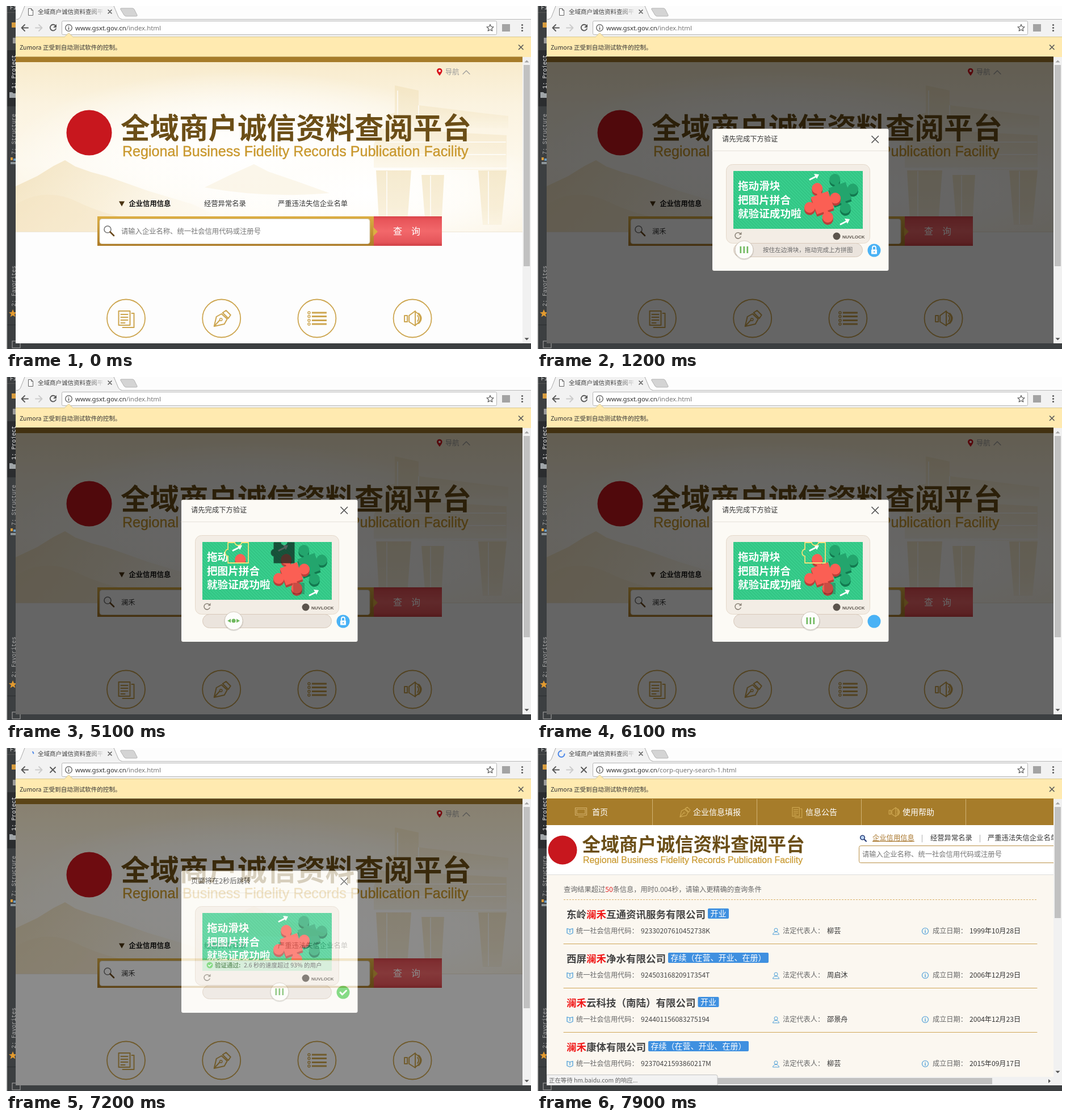
Write an HTML page that moves like this. It is 925 px wide and 605 px high and loops after 8000 ms.

```html
<!DOCTYPE html>
<html lang="zh-CN">
<head>
<meta charset="utf-8">
<title>Slider check</title>
<style>
html, body { margin: 0; width: 100%; height: 100%; overflow: hidden; background: #3c3f41; }
svg { display: block; width: 100vw; height: 100vh; }
text { font-family: 'Noto Sans CJK SC', 'Noto Sans CJK', sans-serif; white-space: pre; }
.lat { font-family: 'Liberation Sans', Arial, sans-serif; }
.url { font-family: 'Noto Sans', 'Open Sans', sans-serif; }
.ide { font-family: 'Liberation Mono', monospace; }
.b { font-weight: 700; }
.line { fill: none; stroke-linecap: round; stroke-linejoin: round; }
</style>
</head>
<body>
<svg id="stage" viewBox="0 0 925 605"></svg>
<script>
const SITE = '全域商户诚信资料查阅平台';
const SITE_EN = 'Regional Business Fidelity Records Publication Facility';
const BRAND = '澜禾';
const HINT = '请输入企业名称、统一社会信用代码或注册号';
const GOLD = '#cda650', DRAG = 117;

const text = (x, y, s, size, fill, attrs = '') =>
  `<text x="${x}" y="${y}" font-size="${size}" fill="${fill}" ${attrs}>${s}</text>`;
const rect = (x, y, w, h, fill, attrs = '') =>
  `<rect x="${x}" y="${y}" width="${w}" height="${h}" fill="${fill}" ${attrs}/>`;
const circle = (x, y, r, fill, attrs = '') =>
  `<circle cx="${x}" cy="${y}" r="${r}" fill="${fill}" ${attrs}/>`;
const shape = (d, fill, attrs = '') => `<path d="${d}" fill="${fill}" ${attrs}/>`;
const line = (d, stroke, w = 1, attrs = '') =>
  `<path class="line" d="${d}" stroke="${stroke}" stroke-width="${w}" ${attrs}/>`;
const group = (id, body, attrs = '') => `<g id="${id}" ${attrs}>${body}</g>`;
const at = (x, y, body, k = 1) => `<g transform="translate(${x} ${y}) scale(${k})">${body}</g>`;
const stops = list => list.map(([o, c, a = 1]) =>
  `<stop offset="${o}" stop-color="${c}" stop-opacity="${a}"/>`).join('');
const gradient = (id, dir, ...list) => `<linearGradient id="${id}" ${dir}>${stops(list)}</linearGradient>`;
const DOWN = 'x1="0" y1="0" x2="0" y2="1"';

const PIECE = 'M472 292h12a6 5 0 0 0 12 0h12v36h-36v-12a5 6 0 0 1 0-12z';

const defs = '<defs>' +
  gradient('sky', DOWN, [0, '#f8ebcc'], [.25, '#fbf3e0'], [.6, '#fdf8ec'], [1, '#fcf5e6']) +
  `<radialGradient id="glow">${stops([[0, '#fff'], [.5, '#fffefb', .85], [1, '#fff', 0]])}</radialGradient>` +
  gradient('hill', 'x1="0" y1="0" x2="1" y2=".4"', [0, '#efdcb2', .75], [.5, '#f6e9cb', .6], [1, '#fdf7ea', .2]) +
  gradient('stone', DOWN, [0, '#f3e4c0'], [.6, '#f6eacd'], [1, '#fbf4e2']) +
  gradient('gold', DOWN, [0, '#dcae43'], [1, '#ad7b27']) +
  gradient('red', DOWN, [0, '#d9444a'], [.12, '#e8555a'], [.5, '#f2686b'], [.88, '#e5555a'], [1, '#cf3f44']) +
  gradient('tabFade', '', [0, '#f2f2f2', 0], [1, '#f2f2f2']) +
  gradient('shineFill', '', [0, '#fff', 0], [.45, '#fff', .9], [.6, '#fff', .95], [1, '#fff', 0]) +
  `<pattern id="stripes" width="4" height="4" patternUnits="userSpaceOnUse" patternTransform="rotate(-45)">
    ${rect(0, 0, 4, 4, '#39cf8d')}${rect(0, 0, 1.4, 4, '#2fc081')}</pattern>
  <clipPath id="page">${rect(17, 89, 893, 506, '#000')}</clipPath>
  <clipPath id="photo">${rect(346, 291, 228, 102, '#000')}</clipPath>
  <clipPath id="pieceClip">${shape(PIECE, '#000')}</clipPath>
  <g id="jig"><path d="M-16-16h32v32h-32zM-24-4h48v8h-48zM-4-27h8v54h-8z"/>
    ${[[24, 0], [-24, 0], [0, 27], [0, -27]].map(([x, y]) => `<circle cx="${x}" cy="${y}" r="9.5"/>`).join('')}</g>
</defs>`;

function ide() {
  const label = (y, s, fill) => text(0, 0, s, 10, fill, `class="ide" transform="translate(16.5 ${y}) rotate(-90)"`);
  return rect(0, 0, 925, 605, '#3c3f41') + rect(0, 0, 2, 605, '#d5d5d5') +
    rect(2, 78, 15, 99, '#2b2d2f') + rect(2, 562, 15, 1, '#2b2d2f') +
    text(7, 6, 'Fi', 10, '#ccc', 'class="ide"') + rect(2, 11, 15, 1, '#555') +
    rect(10, 29, 8, 9, '#d79c3f') + rect(12, 56, 5, 10, '#9a9a9a') +
    label(146, '1: Project', '#eee') + shape('M6 152h5l2 2h4v8H6z', '#a0a5a8') +
    label(262, '7: Structure', '#aaa') + rect(8, 267, 4, 5, '#d79c3f') + rect(13, 269, 4, 4, '#6a9ac0') + rect(8, 275, 9, 4, '#8d9599') +
    label(530, '2: Favorites', '#aaa') + shape('M12 535l2 5 5 .4-4 3.2 1.4 5-4.4-2.8-4.4 2.8 1.4-5-4-3.2 5-.4z', '#e29a2f') +
    rect(11, 591, 14, 12, 'none', 'stroke="#aaa"');
}

function browser() {
  const ink = '#5a5a5a';
  return rect(17, 0, 908, 595, '#fdfdfd') + rect(17, 23, 908, 32, '#f2f2f2') +
    line('M17 23.5H22M203 23.5H925', '#b8b8b8') +
    shape('M20 24Q24 23 26 18L33 0H190L198 19Q200 23 204 24z', '#f2f2f2') +
    line('M20 23.5Q24 23 26 18L33 0M190 0L198 19Q200 23 204 23.5', '#aaa') +
    shape('M203 4h20q2 0 3 2l5 10q1 2-2 2h-17q-3 0-4-2l-6-10q-1-2 1-2z', '#d4d4d4', 'stroke="#b5b5b5"') +
    group('doc', shape('M39.5 4.5h5l3 3v9h-8z', '#fff', 'stroke="#666"') + line('M44.5 4.5v3h3', '#666')) +
    group('spinner', line('M0-5.5A5.5 5.5 0 1 0 5.5 0', '#4a86e8', 2)) +
    text(56, 14, SITE.slice(0, 11), 10.5, '#444') + rect(148, 2, 25, 18, 'url(#tabFade)') +
    line('M180 7l6 6m0-6l-6 6', ink, 1.6) +
    line('M39 38.5H28m5-5.5l-5.5 5.5 5.5 5.5', ink, 1.8) +
    line('M52 38.5h11m-5-5.5l5.5 5.5-5.5 5.5', '#ccc', 1.8) +
    group('reload', line('M87 34.5a5.3 5.3 0 1 0 1 5.5', ink, 1.8) + shape('M89 32v6h-6z', ink)) +
    group('stop', line('M78 34l9 9m0-9l-9 9', ink, 1.8)) +
    rect(98.5, 26.5, 766, 24, '#fff', 'rx="2" stroke="#b5b5b5"') +
    circle(110.5, 38.5, 5.8, 'none', `stroke="${ink}" stroke-width="1.3"`) + line('M110.5 38v3.4M110.5 35.4v.2', ink, 1.5) +
    `<text class="url" x="122" y="43" font-size="11.4" fill="#333">www.gsxt.gov.cn<tspan id="path" fill="#777"></tspan></text>` +
    line('M853 32.5l1.8 4 4.2.4-3.2 2.9 1 4.2-3.8-2.2-3.8 2.2 1-4.2-3.2-2.9 4.2-.4z', ink, 1.2) +
    rect(874, 32, 14, 13, '#a3a3a3') + [33.5, 38.5, 43.5].map(y => circle(909.5, y, 1.6, ink)).join('') +
    rect(17, 55, 908, 35, '#ffeab0') + line('M17 54.5H103M118 54.5H925', '#d9c98f') +
    shape('M103 55l7.5-7 7.5 7z', '#ffeab0') + line('M103 54.5l7.5-7 7.5 7', '#d9c98f') +
    text(24, 77, 'Zumora 正受到自动测试软件的控制。', 10.6, '#333') + line('M903.5 69l7.5 7.5m0-7.5l-7.5 7.5', ink, 1.7);
}

const goldRing = (x, y, r) => circle(x, y, r, 'none', `stroke="${GOLD}" stroke-width="1.5"`);
const icons = {
  docs: line('M-13-13h20v25h-20zM10-9h4v25h-20M-9-7h12M-9-2h12M-9 3h12M-9 8h7', GOLD, 2),
  pen: line('M-13 14l4-17 9-5 10 9-5 9zM-13 14l10-11M2-10l6-4 8 8-4 6z', GOLD, 2) + goldRing(-1, 2, 2.2),
  list: [-10, -3.5, 3.5, 10].map(y => goldRing(-14, y, 2) + rect(-9, y - 1.5, 26, 3, GOLD)).join(''),
  horn: line('M-14-5h5V6h-5zM-6-5L5-13V13L-6 6zM9-5q4 5 0 10M11-9q9 9 0 18M5-12q18 12 0 24', GOLD, 2)
};

function home() {
  const hero = rect(17, 99, 893, 299, 'url(#sky)') +
    '<ellipse cx="420" cy="265" rx="420" ry="150" fill="url(#glow)"/><ellipse cx="640" cy="330" rx="330" ry="110" fill="url(#glow)"/>' +
    shape('M17 318L55 300 84 282 104 272 122 283 150 293 176 300 205 310 250 326 330 350 430 398H17z', 'url(#hill)') +
    shape('M17 350Q70 318 125 345T250 380L300 398H17z', '#f2e2bd', 'opacity=".4"') +
    shape('M350 320L395 298 437 279 462 292 520 312 570 330Q460 340 350 320z', '#f7ecd2', 'opacity=".45"') +
    `<g fill="url(#stone)" opacity=".75"><path d="M685 140l42 9v26l113 14 45 5v22l-215-3v-20l15-5z"/>
      <path d="M660 216l222 12v62l-234-4v-42z" opacity=".7"/><path d="M652 290h62l-8 106h-48zM732 298h40l-5 90h-28zM832 290h50l-9 96h-33z"/></g>` +
    line('M690 150v55M727 176v35M648 286h235M672 240h208M680 262h200M671 292v102M748 300v86M850 292v92', '#fff', 2, 'opacity=".7"') +
    line('M17 398.5H910', '#eee6d6');
  const search = rect(161, 371, 487, 52, 'url(#gold)') + rect(165, 375.5, 476, 44, '#fff', 'rx="4" stroke="#d3c7a8"') +
    circle(179, 394, 6, 'none', 'stroke="#777" stroke-width="1.6"') + line('M183.5 398.5l6.5 6.5', '#6b4a1e', 2.6) +
    group('hint', text(203, 402, HINT, 12.3, '#757575')) + '<text id="query" x="203" y="402" font-size="12.3" fill="#333"></text>' +
    rect(648, 371, 120, 52, 'url(#red)') + shape('M647 390l8 8-8 8z', '#dcae43') +
    text(682, 403, '查', 16, '#fff') + text(714, 403, '询', 16, '#fff');
  return rect(17, 89, 893, 506, '#fdfdfd') + hero + rect(17, 90, 893, 9, '#a67c2a') + rect(17, 89, 893, 1, '#c9ad6b') +
    shape('M764 123q-5-6-5-8.5a4.8 4.8 0 0 1 9.6 0q0 2.5-4.6 8.5z', '#d8141c') + circle(764, 114.5, 2, '#fff') +
    text(774, 121, '导航', 12.3, '#999') + line('M805 120l6-6 6 6', '#999', 1.2) +
    circle(146.5, 223.5, 40, '#c8171e') +
    text(202, 234, SITE, 51.5, '#6b4e17', 'class="b"') +
    text(205, 265, SITE_EN, 25.1, '#c9992f', 'class="lat" stroke="#c9992f" stroke-width=".4"') +
    shape('M199 344.5h10l-5 9z', '#4a3310') + text(216.5, 353, '企业信用信息', 12.3, '#111', 'class="b"') +
    text(349, 353, '经营异常名录', 12.3, '#333') + text(479, 353, '严重违法失信企业名单', 12.3, '#333') + search +
    Object.values(icons).map((icon, i) => at(211.5 + i * 168.2, 551,
      circle(0, 0, 33.5, 'none', `stroke="${GOLD}" stroke-width="1.8"`) + icon)).join('');
}

function photo() {
  const jig = (x, y, fill) => `<use href="#jig" transform="translate(${x} ${y}) rotate(-20)" fill="${fill}"/>`;
  const arrow = (x, y) => at(x, y, line('M-7 4L5-2', '#fff', 3) + shape('M0-6l9 1-4 8z', '#fff'));
  return rect(346, 291, 228, 102, 'url(#stripes)') +
    jig(534, 335, '#12794f') + jig(534, 331, '#23a56d') + jig(503, 351, '#b8403a') + jig(503, 347, '#fb5f54') +
    arrow(488, 302) + arrow(542, 381) +
    ['拖动滑块', '把图片拼合', '就验证成功啦'].map((s, i) => text(354, 324 + i * 24.5, s, 18.6, '#fff', 'font-weight="900"')).join('');
}

function dialog() {
  const tick = (x, y, r) => circle(x, y, r, '#5fd05f') + at(x, y, line('M-5 0l3.5 4 7-7', '#fff', 2.8), r / 11.5);
  const handle = circle(365, 431, 17, '#000', 'opacity=".12"') + circle(365, 430, 16, '#fdfdfb', 'stroke="#d6cdc0"') +
    group('bars', [358, 364, 370].map(x => rect(x - .5, 424, 2.6, 12, '#6fb85e')).join('')) +
    group('arrows', circle(365, 430, 3.5, '#6fb85e') + shape('M360 426.5v7l-6-3.5zM370 426.5v7l6-3.5z', '#6fb85e'));
  const success = rect(346, 374, 228, 19, '#d6ecd6', 'opacity=".94"') + tick(359, 383, 5.5) +
    text(368, 387, '验证通过:', 10.5, '#3d7a3d', 'class="b"') + text(419, 387, '2.6 秒的速度超过 93% 的用户', 10.5, '#555');
  return rect(309, 216.5, 310.5, 250.5, '#fcfaf5', 'rx="3"') + line('M309 255.5H619', '#e6e2da') +
    '<text id="title" x="326" y="239" font-size="12.3" fill="#333"></text>' +
    line('M590 229.5l11.5 11.5m0-11.5l-11.5 11.5', '#555', 1.7) +
    rect(333.5, 279.5, 253, 139, '#f3ede5', 'rx="11" stroke="#e5d9cb"') + group('picture', photo(), 'clip-path="url(#photo)"') +
    group('puzzle', shape(PIECE, '#0b2019', 'opacity=".7" stroke="#0b2019"') + rect(506, 363, 20, 20, '#000', 'opacity=".2"') +
      group('piece', `<g clip-path="url(#pieceClip)"><use href="#picture"/></g>` + line(PIECE, '#f5e27a', 1.8))) +
    `<g clip-path="url(#photo)">${rect(-80, -65, 160, 130, 'url(#shineFill)', 'id="shine"')}${group('success', success)}</g>` +
    line('M358.5 402a5.2 5.2 0 1 0 .5 5', '#8d857a', 1.6) + shape('M360.5 398.5v5h-5z', '#8d857a') +
    circle(528, 406, 6.5, '#5b544c') + text(538, 409.5, 'NUVLOCK', 8, '#5b544c', 'class="lat b"') +
    rect(346.5, 418.5, 227, 24, '#ebe4dd', 'rx="12" stroke="#d8c9ba"') +
    group('tip', text(398, 434, '按住左边滑块，拖动完成上方拼图', 10.55, '#666')) + group('handle', handle) +
    group('blue', circle(594, 431, 11.5, '#4ab2f5') +
      group('lock', rect(589, 429.5, 10, 8, '#fff', 'rx="1"') + line('M591 429v-2.5a3 3 0 0 1 6 0v2.5', '#fff', 1.8) + rect(593.3, 432, 1.6, 3, '#4ab2f5'))) +
    group('done', tick(594, 431, 11.5));
}

function results() {
  const menu = [['首页', 97, ''], ['企业信息填报', 275, 'pen'], ['信息公告', 473, 'docs'], ['使用帮助', 644, 'horn']];
  const rows = [
    ['东岭@互通资讯服务有限公司', 0, '92330207610452738K', '柳芸', '1999年10月28日'],
    ['西屏@净水有限公司', 1, '92450316820917354T', '周启沐', '2006年12月29日'],
    ['@云科技（南陆）有限公司', 0, '924401156083275194', '邵景舟', '2004年12月23日'],
    ['@康体有限公司', 1, '92370421593860217M', '柳芸', '2015年09月17日']
  ];
  const blue = '#4f9fd8';
  const row = ([name, kept, code, person, date], i) => {
    const x = 52 + 17.5 * (name.length + 1) + 4, label = kept ? '存续（在营、开业、在册）' : '开业';
    return `<g transform="translate(0 ${i * 78})">` +
      text(52, 300, name.replace('@', `<tspan fill="#f01818">${BRAND}</tspan>`), 17.5, '#444', 'class="b"') +
      rect(x, 283, label.length * 14 + 9, 18, '#3f90e0', 'rx="2"') + text(x + 4.5, 297, label, 14, '#fff') +
      line('M53 318.5l5 1.5 5-1.5v8l-5 2-5-2zM58 320v5', blue, 1.3) + text(69, 327, '统一社会信用代码：', 12.2, '#666') + text(183, 327, code, 12.1, '#444') +
      circle(421, 321, 3, 'none', `stroke="${blue}"`) + line('M415.5 328.5q1-4 5.5-4t5.5 4z', blue) +
      text(433, 327, '法定代表人：', 12.2, '#666') + text(511, 327, person, 12.2, '#333') +
      circle(684, 323, 5.5, 'none', `stroke="${blue}" stroke-width="1.2"`) + line('M684 322v4M684 320v.1', blue, 1.4) +
      text(697, 327, '成立日期：', 12.2, '#666') + text(762, 327, date, 12.1, '#333') +
      (i < 3 ? line('M47 345.5H881', '#d0a658') : '') + '</g>';
  };
  return rect(17, 89, 893, 506, '#fbf7f0') + rect(17, 136, 893, 87, '#fff') + line('M17 223.5H910', '#ddd') +
    rect(17, 89, 893, 47, '#a67c2a') + [203, 387, 571, 755].map(x => rect(x, 90, 1, 46, '#d0b274')).join('') +
    line('M67.5 105.5h20v13h-20zM70 108h15v8h-15zM73 121.5h9', '#d2b06a', 1.2) +
    menu.map(([s, x, icon]) => text(x, 118, s, 14, '#fff') + (icon ? at(x - 15, 113, icons[icon], .62) : '')).join('') +
    circle(45, 180, 25.5, '#c8171e') + text(79.5, 181.5, SITE, 32.7, '#6b4e17', 'class="b"') +
    text(81, 203, SITE_EN, 15.95, '#c9992f', 'class="lat" stroke="#c9992f" stroke-width=".2"') +
    circle(573.5, 158, 3.8, '#bcd6f5', 'stroke="#2a3f78" stroke-width="1.6"') + line('M577 161.5l3 3', '#2a3f78', 2.2) +
    text(591, 163, '企业信用信息', 12.3, '#a8752a', 'text-decoration="underline"') + text(677, 163, '|', 12, '#999') +
    text(693, 163, '经营异常名录', 12.3, '#333') + text(779, 163, '|', 12, '#999') + text(794, 163, '严重违法失信企业名单', 12.3, '#333') +
    rect(567.5, 172.5, 360, 30, '#fff', 'rx="3" stroke="#b98f45"') + text(573, 192, HINT, 12.3, '#757575') +
    text(47, 254, '查询结果超过<tspan fill="#e02020">50</tspan>条信息，用时0.004秒，请输入更精确的查询条件', 12.2, '#666') +
    line('M47 267.5H881', '#d9b068', 1, 'stroke-dasharray="3 2" style="stroke-linecap:butt"') + rows.map(row).join('') +
    rect(17, 580, 893, 15, '#f1f1f1') + rect(300, 582, 502, 11, '#c1c1c1') + shape('M901 584l4 3.5-4 3.5z', '#505050') +
    shape('M17 576.5H315q3 0 3 3V595H17z', '#f2f2f2', 'stroke="#c4c4c4"') +
    text(21, 590, '正在等待 hm.baidu.com 的响应...', 10.4, '#666');
}

const scrollbar = rect(910, 90, 15, 505, '#f1f1f1') + shape('M913.5 99.5l4-4 4 4z', '#a3a3a3') +
  rect(912, 104, 11, 355, '#c1c1c1', 'id="thumb"') + shape('M913.5 585.5l4 4 4-4z', '#505050', 'id="downArrow"');

document.getElementById('stage').innerHTML = defs + ide() + browser() +
  `<g clip-path="url(#page)">${group('home', home())}${group('results', results())}` +
  group('modal', rect(17, 89, 893, 506, '#000', 'opacity=".6"') + dialog()) + '</g>' + scrollbar;

const el = Object.fromEntries([...document.querySelectorAll('#stage [id]')].map(n => [n.id, n]));
const clamp = v => Math.max(0, Math.min(1, v));
const show = (node, on) => node.setAttribute('display', on ? 'inline' : 'none');
const move = (node, x, y = 0) => node.setAttribute('transform', `translate(${x} ${y})`);
const fade = (node, v) => node.setAttribute('opacity', v);

function render(ms) {
  const t = Math.floor(ms / 100) * 100;
  const loading = t >= 7200, found = t >= 7600, passed = t >= 6300;

  show(el.doc, !loading);
  show(el.spinner, loading);
  el.spinner.setAttribute('transform', `translate(43 10.5) rotate(${(7900 - t) / 100 * -40})`);
  el.spinner.firstChild.setAttribute('stroke-dasharray', found ? '26 40' : '3 40');
  show(el.reload, !loading);
  show(el.stop, loading);
  el.path.textContent = found ? '/corp-query-search-1.html' : '/index.html';

  show(el.home, !found);
  show(el.results, found);
  el.thumb.setAttribute('height', found ? 196 : 355);
  move(el.downArrow, 0, found ? -16 : 0);
  show(el.hint, t < 500);
  el.query.textContent = BRAND.slice(0, t < 500 ? 0 : t < 600 ? 1 : 2);

  const open = clamp((t - 900) / 300) * clamp(1 - (t - 7100) / 400);
  show(el.modal, open > 0);
  fade(el.modal, open);
  el.title.textContent = passed ? '页面将在2秒后跳转' : '请先完成下方验证';

  const hover = clamp((t - 3700) / 300);
  const shift = DRAG * clamp((t - 4600) / 900) ** 2;
  show(el.puzzle, hover > 0 && !passed);
  fade(el.puzzle, clamp(hover * 1.3));
  fade(el.tip, 1 - hover);
  move(el.piece, shift - DRAG);
  move(el.handle, shift);
  const held = t >= 3800 && t < 6100;
  show(el.arrows, held);
  show(el.bars, !held);

  show(el.blue, !passed);
  show(el.lock, t < 6100);
  show(el.done, passed);
  show(el.success, passed);
  move(el.success, 0, 19 * (1 - clamp((t - 6200) / 300)));
  show(el.shine, passed && t < 7100);
  el.shine.setAttribute('transform', `translate(${250 + (t - 6300) * .4} 342) skewX(-15)`);
}

const start = performance.now();
function tick() {
  render((performance.now() - start) % 8000);
  requestAnimationFrame(tick);
}
render(0);
requestAnimationFrame(tick);
</script>
</body>
</html>
```
